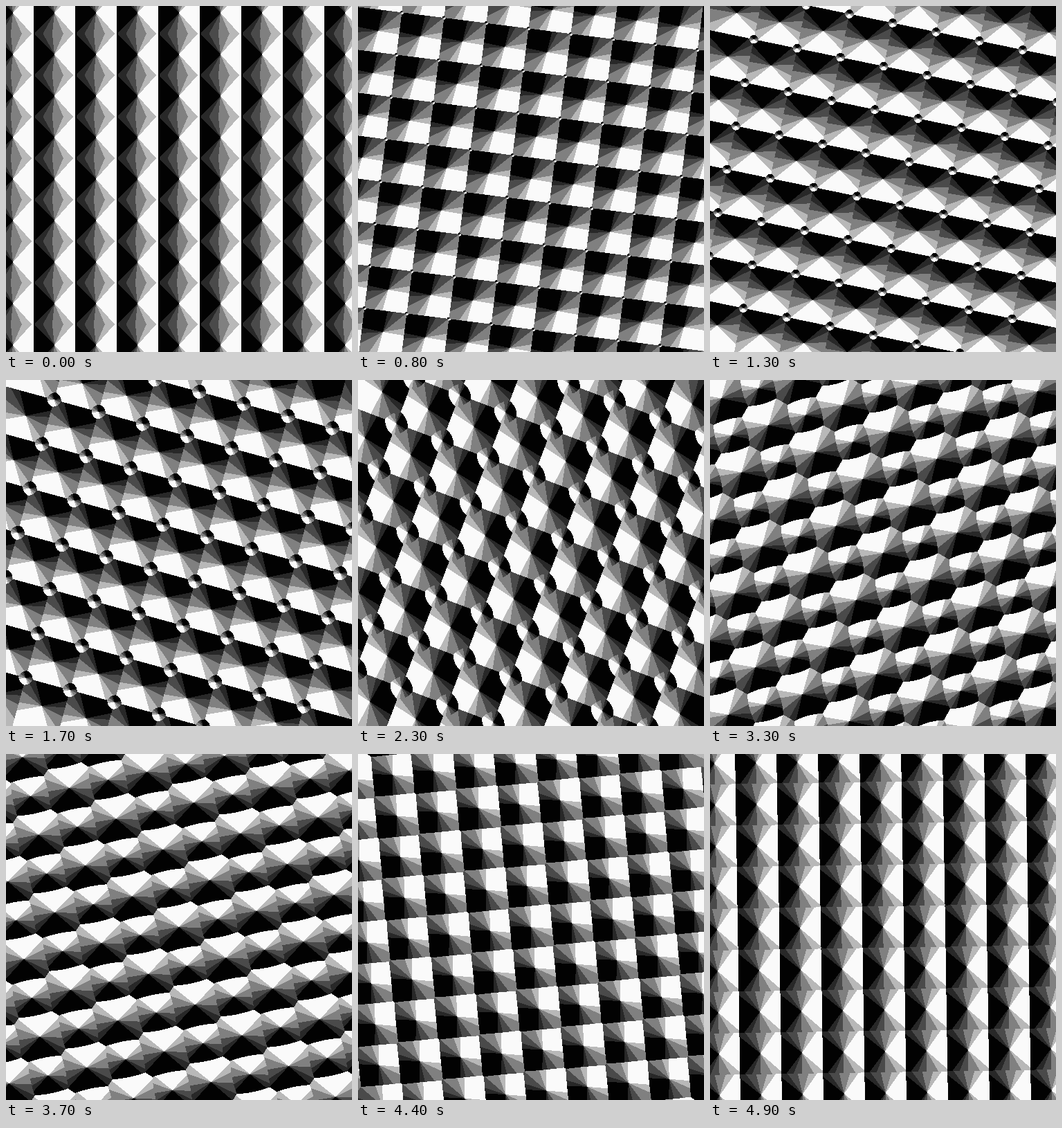
Animation, 500 px wide and 500 px high, one loop 5 s. Source, as an HTML page with a canvas:

```html
<!DOCTYPE html>
<html lang="en">
<head>
<meta charset="utf-8">
<title>Rotating cone lattice</title>
<style>
html, body { margin: 0; width: 100%; height: 100%; overflow: hidden; background: #000; }
canvas { display: block; width: 500px; height: 500px; }
</style>
</head>
<body>
<canvas id="stage" width="500" height="500"></canvas>
<script>
const SIZE = 500, LOOP = 5000, STEP = 100, PITCH = 60, REACH = 4;
const ctx = document.getElementById('stage').getContext('2d');
const image = ctx.createImageData(SIZE, SIZE);
const pixels = new Uint32Array(image.data.buffer);

const grey = v => (0xff000000 | v << 16 | v << 8 | v) >>> 0;
const limit = deg => Math.cos(deg * Math.PI / 180);
const clamp = (v, max) => Math.max(-max, Math.min(max, v));

// Tone bands by angle away from the light
const bands = [[48, 250], [67, 184], [96, 128], [119, 74], [134, 40], [181, 2]]
  .map(([deg, v]) => ({ min: deg > 180 ? -2 : limit(deg), color: grey(v) }));

function tone(c) {
  let i = 0;
  while (c < bands[i].min) i++;
  return bands[i].color;
}

// Nearest point of each finite lattice, in lattice units
const corner = v => clamp(Math.round(v), REACH);
const middle = v => clamp(Math.floor(v) + 0.5, REACH - 0.5);

// Two interleaved square lattices of cones with equal height; the cones of
// the second widen from nothing until both are alike.
function draw(p) {
  const grow = (1 - Math.cos(Math.PI * p)) / 2;
  const pitch = PITCH * (1 + (Math.SQRT2 - 1) * grow);
  const turn = p * Math.PI / 4;
  const cos = Math.cos(turn) / pitch, sin = Math.sin(turn) / pitch;
  const light = p * Math.PI * 2 - turn;
  const lx = Math.cos(light), ly = Math.sin(light);

  for (let y = 0, i = 0; y < SIZE; y++) {
    const dy = y + 0.5 - SIZE / 2;
    for (let x = 0; x < SIZE; x++, i++) {
      const dx = x + 0.5 - SIZE / 2;
      const u = dx * cos + dy * sin;
      const v = dy * cos - dx * sin;
      let ou = u - corner(u), ov = v - corner(v);
      let dist = Math.sqrt(ou * ou + ov * ov);
      const bu = u - middle(u), bv = v - middle(v);
      const other = Math.sqrt(bu * bu + bv * bv);
      if (other < dist * grow) {
        ou = bu;
        ov = bv;
        dist = other;
      }
      pixels[i] = tone((ou * lx + ov * ly) / (dist || 1));
    }
  }
  ctx.putImageData(image, 0, 0);
}

const start = performance.now();
let shown = -1;

function tick() {
  const time = Math.max(0, performance.now() - start) % LOOP;
  const step = Math.floor(time / STEP);
  if (step !== shown) {
    shown = step;
    draw(step * STEP / LOOP);
  }
  requestAnimationFrame(tick);
}
tick();
</script>
</body>
</html>
```
